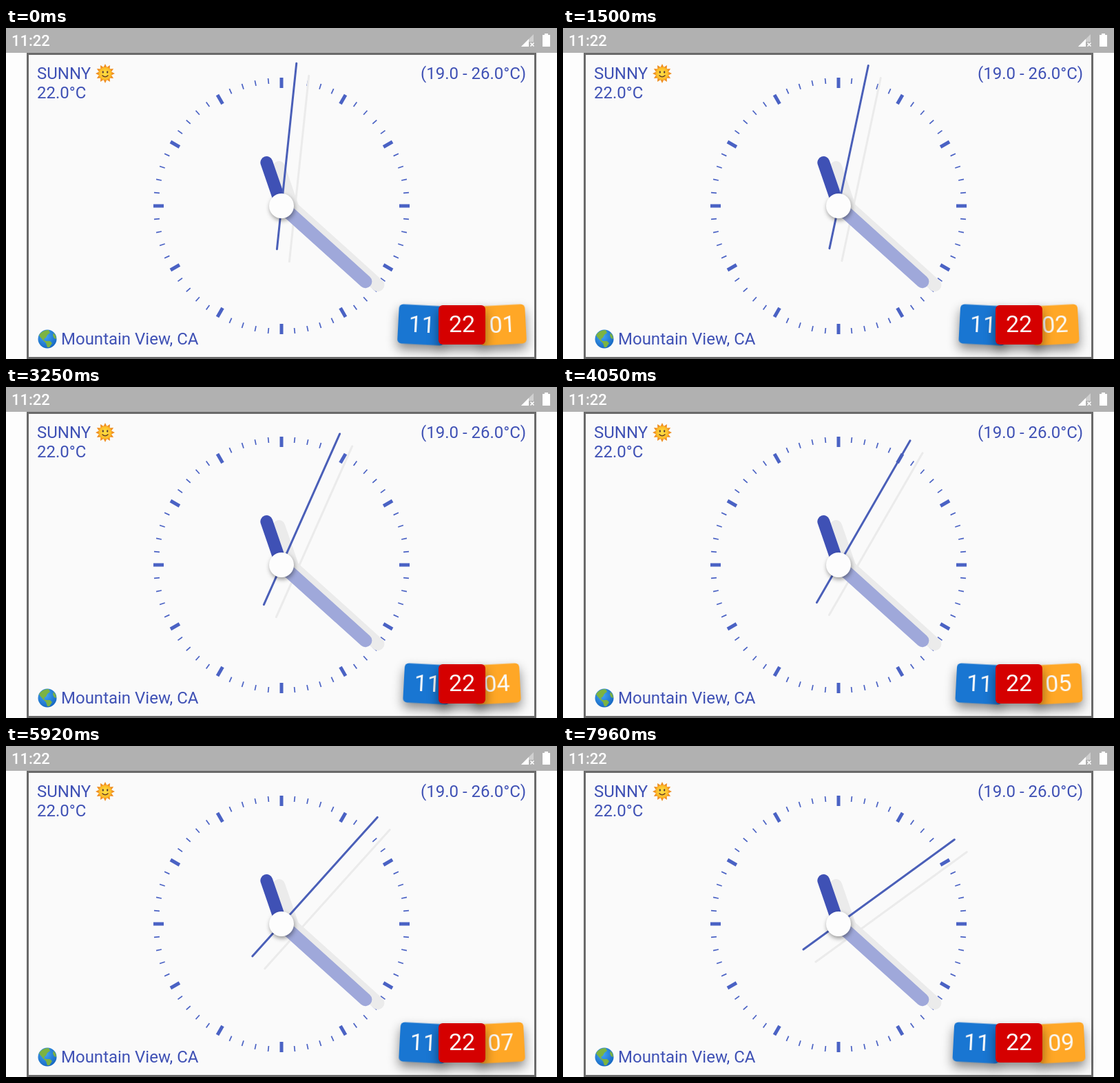
An HTML page for the animation above (8000 ms loop, 800 by 480 pixels).

```html
<!DOCTYPE html>
<html lang="en">
<head>
<meta charset="utf-8">
<title>Clock face</title>
<style>
  html, body { margin: 0; width: 100%; height: 100%; overflow: hidden; background: #fdfdfd; }
  svg { display: block; width: 800px; height: 480px; }
  text { font-family: Roboto, sans-serif; }
  .info { font-size: 24px; fill: #3f51b5; }
  .status { font-size: 22px; font-weight: 500; fill: #fff; }
  .card { filter: drop-shadow(0 8px 8px rgba(0, 0, 0, .45)); }
  .card text { font-size: 34px; fill: #fafafa; text-anchor: middle; }
  .hub { filter: drop-shadow(1px 3px 3px rgba(0, 0, 0, .4)); }
  .hand { stroke-linecap: round; fill: none; }
  .shade { stroke: #ebebeb; }
</style>
</head>
<body>
<svg viewBox="0 0 800 480">
  <defs>
    <radialGradient id="sea" cx=".4" cy=".35" r=".7">
      <stop offset="0" stop-color="#42a5f5"/>
      <stop offset="1" stop-color="#1565c0"/>
    </radialGradient>
    <radialGradient id="glow">
      <stop offset=".3" stop-color="#ffd93f"/>
      <stop offset="1" stop-color="#fbb423"/>
    </radialGradient>
  </defs>

  <rect x="31.5" y="37.5" width="737" height="441" fill="#fafafa" stroke="#6a6a6a" stroke-width="3"/>

  <rect width="800" height="36" fill="#b1b1b1"/>
  <text class="status" x="8" y="26">11:22</text>
  <g fill="#fff">
    <path d="M748 27L766 9V20H758V27Z" opacity=".4"/>
    <path d="M748 27L759 16V27Z"/>
    <path d="M761.5 21.5l5 5m0-5l-5 5" stroke="#fff" stroke-width="1.6"/>
    <path d="M782 8h5v2h3v17h-11v-17h3z"/>
  </g>

  <text class="info" x="45" y="74">SUNNY</text>
  <text class="info" x="45" y="102">22.0°C</text>
  <text class="info" x="755" y="74" text-anchor="end">(19.0 - 26.0°C)</text>
  <text class="info" x="80" y="459">Mountain View, CA</text>

  <g transform="translate(144 66)">
    <g id="rays" fill="#ef8f22"></g>
    <circle r="9.5" fill="url(#glow)"/>
    <ellipse cx="-3.2" cy="-2" rx="1.2" ry="1.8" fill="#5d4037"/>
    <ellipse cx="3.2" cy="-2" rx="1.2" ry="1.8" fill="#5d4037"/>
    <path d="M-4.5 2.5Q0 7 4.5 2.5" fill="none" stroke="#6d4526" stroke-width="1.5"/>
  </g>

  <g transform="translate(60 451)">
    <circle r="13.5" fill="url(#sea)"/>
    <path d="M-12-5Q-8-13 2-13L4-9L0-6L-2-2L-5 0L-3 3L4 3L7 6L3 12L0 12L-2 6L-7 1Z" fill="#7cb342"/>
    <path d="M9-9L12-5L13 0L10-1L8-5Z" fill="#7cb342"/>
  </g>

  <g transform="translate(400 258)">
    <g id="ticks" stroke="#4a62c4"></g>
    <path class="hand shade" d="M0 0V-66.5" stroke-width="18" transform="translate(18 7) rotate(-19)"/>
    <path class="hand shade" d="M0 0V-164" stroke-width="19" transform="translate(18 5) rotate(132)"/>
    <g transform="translate(18 18)"><path class="second hand shade" d="M0 63V-208" stroke-width="3"/></g>
    <path class="hand" d="M0 0V-164" stroke="#9fa8da" stroke-width="19" transform="rotate(132)"/>
    <path class="hand" d="M0 0V-66.5" stroke="#3f51b5" stroke-width="18" transform="rotate(-19)"/>
    <path class="second hand" d="M0 63V-208" stroke="#4a5fb8" stroke-width="3"/>
    <circle class="hub" r="18" fill="#fdfdfd"/>
  </g>

  <g id="cards"></g>
</svg>
<script>
  const LOOP = 8000;
  const START_SECOND = 1.12;
  const CARD = { x: 662, y: 430.5, tilt: 3 };
  // Card spread over one second, as [phase, distance].
  const SPREAD = [[0, 47], [.07, 61.3], [.12, 58.6], [.37, 49], [.92, 52], [1, 47]];

  const byId = id => document.getElementById(id);
  const add = (parent, name, attrs) => {
    const node = document.createElementNS('http://www.w3.org/2000/svg', name);
    for (const key in attrs) node.setAttribute(key, attrs[key]);
    return parent.appendChild(node);
  };

  for (let i = 0; i < 60; i++) {
    const major = i % 5 === 0;
    add(byId('ticks'), 'path', {
      d: `M0-186V${major ? -171 : -178}`,
      'stroke-width': major ? 5 : 1.7,
      transform: `rotate(${i * 6})`
    });
  }

  for (let i = 0; i < 12; i++) {
    add(byId('rays'), 'path', { d: 'M-3-8L0-14L3-8Z', transform: `rotate(${i * 30})` });
  }

  function makeCard(color, label) {
    const card = add(byId('cards'), 'g', { class: 'card' });
    add(card, 'rect', { x: -34, y: -28.5, width: 68, height: 57, rx: 6, fill: color });
    const text = add(card, 'text', { y: 10.5 });
    text.textContent = label;
    return { card, text };
  }

  const hours = makeCard('#1976d2', '11');
  const seconds = makeCard('#ffa726', '01');
  const minutes = makeCard('#d50000', '22');
  const secondHands = document.querySelectorAll('.second');

  function place({ card }, offset, tilt) {
    card.setAttribute('transform', `translate(${CARD.x + offset} ${CARD.y}) rotate(${tilt})`);
  }

  function spreadAt(phase) {
    const next = Math.max(1, SPREAD.findIndex(([p]) => p > phase));
    const [p0, v0] = SPREAD[next - 1];
    const [p1, v1] = SPREAD[next];
    const k = (phase - p0) / (p1 - p0);
    return v0 + (v1 - v0) * k * k * (3 - 2 * k);
  }

  function draw(ms) {
    const t = ms / 1000;
    const clock = t + START_SECOND;
    const second = Math.floor(clock);
    // Alternate seconds swing slightly wider.
    const spread = spreadAt(clock - second) - 2 * Math.sin(Math.PI * t);
    secondHands.forEach(hand => hand.setAttribute('transform', `rotate(${second * 6})`));
    seconds.text.textContent = String(second).padStart(2, '0');
    place(hours, -spread, CARD.tilt);
    place(seconds, spread, -CARD.tilt);
  }

  place(minutes, 0, 0);
  const start = performance.now();
  function frame() {
    draw((performance.now() - start) % LOOP);
    requestAnimationFrame(frame);
  }
  frame();
</script>
</body>
</html>
```
